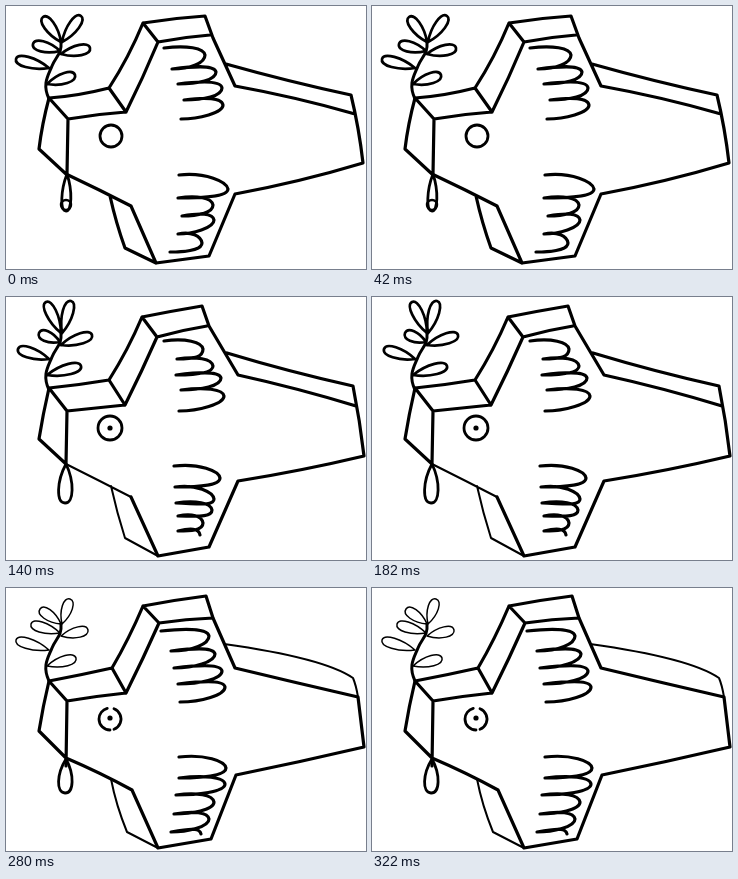
Animation, 360 px wide and 263 px high, one loop 350 ms. Source, as an HTML page with a canvas:

```html
<!DOCTYPE html>
<html lang="en">
<head>
<meta charset="utf-8">
<title>Paper dove</title>
<style>
html, body { margin: 0; width: 100%; height: 100%; overflow: hidden; background: #fff; }
canvas { display: block; }
</style>
</head>
<body>
<canvas id="stage" width="360" height="263"></canvas>
<script>
const ctx = document.getElementById('stage').getContext('2d');
const HOLD = 70;

// Where the six leaves join the twig, from bottom to top.
const leafBases = [[41, 78], [43, 62], [55, 48], [54, 45], [56, 36], [55, 36]];

// bold / fine: outlines; upper / lower: feather points, alternating root and tip.
const poses = [
  {
    bold: 'M43 92Q72 90 103 82Q123 51 137 17Q168 12 199 10L207 32L229 80Q290 91 349 108' +
      'M137 17L152 36Q178 31 204 29M152 36Q137 72 120 106L103 82M120 106Q91 108 62 113L43 92' +
      'Q36 118 33 143L60 168Q94 184 125 200L150 257L203 250L229 188Q294 176 357 157' +
      'Q353 122 345 89Q284 76 220 58M62 113L61 168M104 190Q110 217 119 242L150 257',
    fine: '',
    upper: [158, 42, 199, 49, 166, 63, 210, 66, 172, 78, 216, 82, 178, 94, 217, 99, 175, 113],
    lower: [173, 169, 222, 183, 172, 192, 207, 199, 176, 210, 208, 214, 172, 228, 196, 237, 164, 246],
    tips: [[69, 69], [10, 53], [84, 42], [27, 38], [75, 10], [37, 11]],
    leafPen: 2.7,
    eye: [105, 130, 11, 11], pupil: null,
    drop: [61, 168, 60, 205, 6], ring: [60, 199, 5]
  },
  {
    bold: 'M43 95Q73 89 104 82Q125 52 138 19Q166 13 194 10L203 30L226 73M229 79Q286 94 338 110M345 112L348 112' +
      'M138 19L152 38Q178 32 203 29M152 38Q138 73 121 106L104 82M121 106Q92 110 63 114L43 95' +
      'Q36 118 33 141L60 168Q95 183 125 200L150 256L203 249L233 186Q295 176 358 159' +
      'M355 153Q353 121 348 89Q283 75 219 57M63 114L60 168M105 189Q111 216 121 241L150 256',
    fine: '',
    upper: [158, 44, 201, 51, 166, 62, 211, 69, 170, 79, 217, 82, 178, 95, 217, 100, 178, 113],
    lower: [168, 167, 223, 180, 170, 192, 208, 199, 172, 209, 206, 213, 173, 224, 194, 231, 170, 240],
    tips: [[72, 67], [12, 54], [86, 41], [31, 32], [65, 10], [34, 11]],
    leafPen: 2.7,
    eye: [105, 131, 12, 13], pupil: [103, 131],
    drop: [61, 168, 60, 203, 8], ring: null
  },
  {
    bold: 'M43 91Q73 88 103 83Q122 53 136 20Q166 14 196 9L203 29L232 78Q291 91 350 109' +
      'M136 20L151 40Q176 33 201 29M151 40Q136 74 119 108L103 83M119 108Q90 111 61 114L43 91' +
      'Q37 117 33 142L60 167M125 200L152 259L203 250L232 184Q295 174 358 159' +
      'Q354 124 347 89Q284 75 221 56M61 114L60 167',
    fine: 'M60 167Q94 184 125 200M105 189Q111 216 119 241L152 259',
    upper: [158, 44, 197, 52, 171, 62, 207, 69, 170, 78, 215, 81, 175, 93, 218, 99, 173, 114],
    lower: [168, 169, 214, 181, 169, 190, 208, 202, 170, 206, 206, 213, 172, 219, 197, 226, 172, 234, 194, 238],
    tips: [[75, 69], [12, 52], [86, 38], [33, 36], [65, 4], [40, 5]],
    leafPen: 2.7,
    eye: [104, 131, 12, 12], pupil: [104, 131],
    drop: [60, 167, 59, 206, 9], ring: null
  },
  {
    bold: 'M41 95Q73 89 105 82Q123 51 137 17Q166 13 194 10L203 31L230 79Q288 92 344 109' +
      'M137 17L151 40Q177 34 203 30M151 40L128 93M122 106L105 82M121 106Q91 110 60 114L41 95' +
      'Q34 118 32 141L60 167Q95 183 125 198L149 255L203 251L232 187Q295 174 357 156' +
      'M356 148Q351 118 343 87Q282 75 222 58M60 114L60 167M104 190Q111 217 121 241L149 255',
    fine: '',
    upper: [158, 45, 201, 54, 169, 63, 213, 70, 170, 78, 216, 84, 175, 93, 221, 98, 175, 108],
    lower: [168, 168, 215, 181, 171, 194, 208, 202, 171, 208, 209, 215, 172, 222, 202, 228, 165, 234, 194, 240, 166, 246],
    tips: [[73, 67], [15, 53], [85, 41], [29, 31], [66, 7], [36, 6]],
    leafPen: 2.4,
    eye: [104, 131, 12, 15], pupil: [104, 131],
    drop: [61, 167, 59, 208, 10], ring: [59, 203, 6]
  },
  {
    bold: 'M43 93Q75 87 106 80Q123 51 137 18Q168 12 200 8L207 30L229 80Q291 95 352 109' +
      'M137 18L153 35Q180 31 207 30M153 35Q137 71 120 105L106 80M120 105Q91 108 61 113L43 93' +
      'Q37 118 33 143L60 170Q95 185 126 202L152 260L205 251L230 187Q294 174 358 159L352 109M61 113L60 178',
    fine: 'M352 109Q350 97 347 90Q318 70 218 56M105 191Q110 217 121 244L152 260',
    upper: [155, 43, 203, 48, 165, 63, 209, 66, 168, 80, 216, 83, 172, 96, 219, 99, 174, 114],
    lower: [173, 169, 220, 180, 173, 190, 219, 196, 170, 207, 208, 214, 168, 226, 203, 231, 165, 244, 195, 246],
    tips: [[70, 70], [10, 52], [82, 42], [25, 36], [64, 11], [34, 21]],
    leafPen: 1.5,
    eye: [104, 131, 11, 11], pupil: [104, 130], brokenEye: true,
    drop: [60, 171, 59, 205, 9], ring: null
  }
];

function stroke(width, trace) {
  ctx.lineWidth = width;
  ctx.beginPath();
  trace();
  ctx.stroke();
}

function strokePath(width, data) {
  ctx.lineWidth = width;
  ctx.stroke(new Path2D(data));
}

// A pointed root and a rounded tip, used for leaves and the drop.
function petal(x, y, tipX, tipY, bulge) {
  const dx = tipX - x, dy = tipY - y, length = Math.hypot(dx, dy);
  const nx = -dy / length * bulge, ny = dx / length * bulge;
  ctx.moveTo(x, y);
  ctx.bezierCurveTo(x + dx * .45 + nx, y + dy * .45 + ny, tipX + nx, tipY + ny, tipX, tipY);
  ctx.bezierCurveTo(tipX - nx, tipY - ny, x + dx * .45 - nx, y + dy * .45 - ny, x, y);
}

function feathers(points) {
  ctx.moveTo(points[0], points[1]);
  for (let i = 0; i + 3 < points.length; i += 4) {
    const [x, y, tipX, tipY, endX, endY] = points.slice(i, i + 6);
    const reach = tipX - x;
    ctx.bezierCurveTo(x + reach * .55, y - 3, tipX - 1, tipY - 7, tipX, tipY);
    if (endX !== undefined) {
      ctx.bezierCurveTo(tipX, tipY + 8, endX + reach * .45, endY, endX, endY);
    }
  }
}

function drawEye({ eye: [x, y, rx, ry], pupil, brokenEye }) {
  stroke(2.8, () => {
    if (brokenEye) {
      ctx.ellipse(x, y, rx, ry, 0, -1.2, 1.2);
      ctx.moveTo(x, y + ry);
      ctx.ellipse(x, y, rx, ry, 0, Math.PI / 2, Math.PI * 1.42);
    } else {
      ctx.ellipse(x, y, rx, ry, 0, 0, Math.PI * 2);
    }
  });
  if (pupil) {
    ctx.beginPath();
    ctx.arc(...pupil, 2.6, 0, Math.PI * 2);
    ctx.fill();
  }
}

function draw(pose) {
  ctx.fillStyle = '#fff';
  ctx.fillRect(0, 0, 360, 263);
  ctx.fillStyle = ctx.strokeStyle = '#000';
  ctx.lineCap = ctx.lineJoin = 'round';
  strokePath(3.2, pose.bold);
  strokePath(2, pose.fine);
  strokePath(3, 'M43 93C36 78 42 70 46 60S56 48 55 36');
  stroke(pose.leafPen, () => leafBases.forEach((base, i) => petal(...base, ...pose.tips[i], 7)));
  stroke(3.2, () => feathers(pose.upper));
  stroke(3.2, () => feathers(pose.lower));
  stroke(2.8, () => petal(...pose.drop));
  if (pose.ring) stroke(2.4, () => ctx.arc(...pose.ring, 0, Math.PI * 2));
  drawEye(pose);
}

const start = performance.now();
let shown = -1;

function tick(now) {
  const index = Math.floor(Math.max(0, now - start) / HOLD) % poses.length;
  if (index !== shown) draw(poses[shown = index]);
  requestAnimationFrame(tick);
}
tick(start);
</script>
</body>
</html>
```
